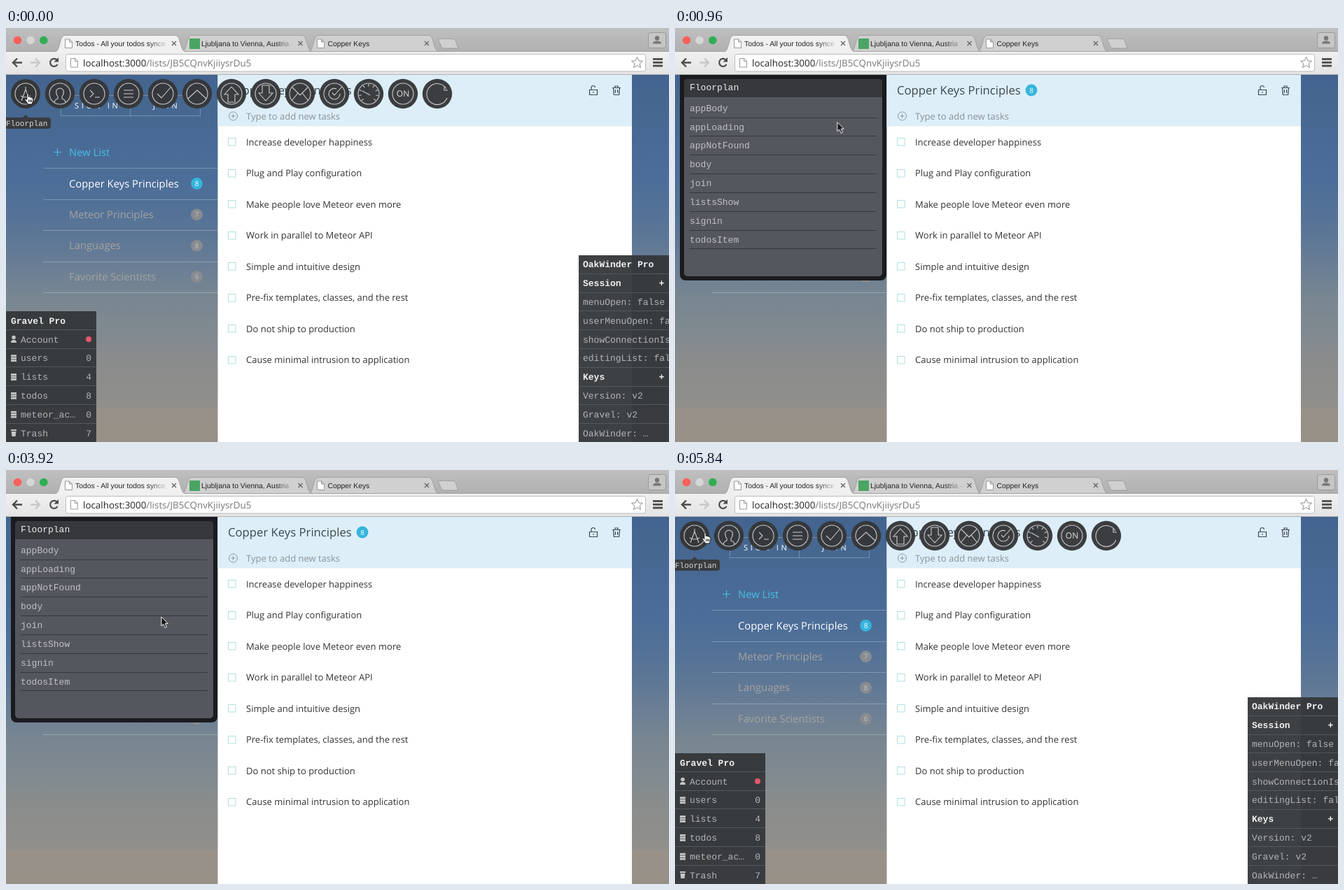
Recreate the animation shown at these times as an HTML page. Size 947 px wide and 592 px high, loop 5.92 s.

```html
<!DOCTYPE html>
<html lang="en">
<head>
<meta charset="utf-8">
<title>Todos</title>
<style>
@property --f { syntax: '<number>'; inherits: true; initial-value: 0; }
html, body { margin: 0; width: 100%; height: 100%; overflow: hidden; }
#stage { position: relative; width: 947px; height: 592px; overflow: hidden;
  --loop: 5920ms; animation: open var(--loop) ease infinite; }
#stage svg, #page, #page > div { position: absolute; left: 0; top: 0; }
#stage svg { overflow: visible; }
#page { width: 947px; height: 592px; clip-path: inset(67px 0 0 0);
  background: linear-gradient(#42648f 67px, #46678f 110px, #486a95 160px, #4d6e98 225px, #5a7596 290px,
    #6a7e95 340px, #788691 385px, #818a90 440px, #8a8c8c 475px, #908f8b 543px, #989189 543px, #969087); }
text { font-family: "Open Sans", sans-serif; white-space: pre; text-rendering: geometricPrecision; }
.mono, .mono text { font: 13px "Liberation Mono", monospace; }
.mono .b { font-weight: bold; fill: #f0f0f0; }
.tab { font: 10.35px "Liberation Sans", sans-serif; fill: #222; }
.mid { text-anchor: middle; }
.end { text-anchor: end; }

#tools { transform: translateY(calc(var(--f) * -95px)); }
#left, #right { opacity: calc(1 - var(--f) * .9); }
#left { transform: translate(calc(var(--f) * -130px), calc(var(--f) * 130px)); }
#right { transform: translate(calc(var(--f) * 130px), calc(var(--f) * 130px)); }
#tip { animation: tip var(--loop) step-end infinite; }

#page > #panel { left: 7px; top: calc(73px - var(--f) * 41px); overflow: hidden;
  width: calc(42px + var(--f) * 253px); height: calc(42px + var(--f) * 287px);
  border-radius: calc(21px - var(--f) * 13px);
  background: color-mix(in srgb, #1a1b1e min(100%, var(--f) * 160%), #353739); }
#panel svg { opacity: min(1, 1.8 * (1 - var(--f))); }
#content { position: absolute; left: 6px; right: 6px; bottom: 6px; top: calc(68px - var(--f) * 27px);
  overflow: hidden; border-radius: 5px; color: #c0c1c3; opacity: min(1, 2 * var(--f));
  background: color-mix(in srgb, #54575e calc(var(--f) * 100%), #35373a); }
#content h1 { margin: 0; padding-left: 8px; color: #ececec;
  background: color-mix(in srgb, #36383c calc(var(--f) * 100%), #222326);
  font: inherit; line-height: 26px; position: relative; z-index: 1; }
#strip { animation: view var(--loop) step-end infinite; }
.view { position: relative; left: 8px; width: 267px; height: 256px; box-sizing: border-box; white-space: pre; }
.list { padding-top: 3px; }
.list div { height: 25.85px; line-height: 27px; border-bottom: 1px solid #35373b; }
.json { padding-top: 7px; line-height: 16.63px; }
.json b { font-weight: 400; color: #f0517f; }
.json i { font-style: normal; color: #b4d455; }
.json u { text-decoration: none; color: #7fd0ee; }

#cursor { animation: move var(--loop) linear infinite; }
#hand { animation: hand var(--loop) step-end infinite; }
#arrow { animation: arrow var(--loop) step-end infinite; }

@keyframes open { 0%, .68% { --f: 0; } 6.93%, 86.15% { --f: 1; } 92.4%, 100% { --f: 0; } }
@keyframes tip { 0% { visibility: visible; } 1% { visibility: hidden; } 86.2% { visibility: visible; } }
@keyframes view {
  0% { transform: none; } 18.6% { transform: translateY(-256px); } 25.3% { transform: translateY(-512px); }
  36.8% { transform: translateY(-768px); } 43.2% { transform: translateY(-1024px); } 61.1% { transform: none; }
}
@keyframes move {
  0%, 1.35% { transform: translate(31px, 93px); }
  4%, 9.5% { transform: translate(32px, 91px); }
  18.6% { transform: translate(302px, 150px); }
  25.3% { transform: translate(375px, 186px); }
  32.43% { transform: translate(385px, 210px); }
  36.8% { transform: translate(388px, 230px); }
  43.2% { transform: translate(391px, 275px); }
  47.3% { transform: translate(394px, 310px); }
  50%, 55.4% { transform: translate(394px, 315px); }
  66.22% { transform: translate(222px, 210px); }
  83%, 100% { transform: translate(43px, 89px); }
}
@keyframes hand {
  0% { visibility: visible; } 3% { visibility: hidden; } 18.6% { visibility: visible; }
  61.1% { visibility: hidden; } 86.8% { visibility: visible; }
}
@keyframes arrow {
  0% { visibility: hidden; } 3% { visibility: visible; } 18.6% { visibility: hidden; }
  61.1% { visibility: visible; } 86.8% { visibility: hidden; }
}
</style>
</head>
<body>
<div id="stage">
  <div id="page">
    <svg id="app" width="947" height="592"></svg>
    <svg id="left" class="mono" width="947" height="592"></svg>
    <svg id="right" class="mono" width="947" height="592"></svg>
    <svg id="tools" width="947" height="592"></svg>
    <svg id="tip" width="947" height="592">
      <path d="M24 128l4-4 4 4H60a4 4 0 0 1 4 4v8a4 4 0 0 1-4 4H0V128Z" fill="#393b3d"/>
      <text x="0" y="139.5" fill="#d8d8d8" style="font:11px 'Liberation Mono',monospace">Floorplan</text>
    </svg>
    <div id="panel" class="mono">
      <svg id="compass" width="42" height="42"></svg>
      <div id="content"><h1>Floorplan</h1><div id="strip"></div></div>
    </div>
  </div>
  <svg id="chrome" width="947" height="67"></svg>
  <svg id="cursor" width="20" height="20" stroke-linejoin="round">
    <path id="arrow" d="M0 0V13.2L3 10.4 5.2 15.6 7.6 14.6 5.4 9.6H9.4Z" fill="#111" stroke="#fff"/>
    <path id="hand" d="M-1.2 1.2Q0-.8 1.2 1.2V5.4Q2.6 4.4 3.4 6 5 5.2 5.6 6.8 7.6 6.2 7.8 8.4V11Q7.6 13 6.4 14.4V16H-.4V14.6Q-2.2 12.8-4 9.6-4.6 7.6-2.6 8.2L-1.2 9.8Z
      M1.6 9.5V13M3.6 9.5V13M5.5 9.5V13" fill="#fff" stroke="#111"/>
  </svg>
</div>
<script>
const put = (id, ...parts) => { document.getElementById(id).innerHTML = parts.flat().join(''); };
const text = (x, y, s, size, fill, more = '') =>
  `<text x="${x}" y="${y}" dy=".35em" fill="${fill}" ${size ? `font-size="${size}"` : ''} ${more}>${s}</text>`;
const rect = (x, y, w, h, fill, more = '') =>
  `<rect x="${x}" y="${y}" width="${w}" height="${h}" fill="${fill}" ${more}/>`;
const dot = (x, y, r, fill, more = '') => `<circle cx="${x}" cy="${y}" r="${r}" fill="${fill}" ${more}/>`;
const line = (d, stroke, width = 1, more = '') =>
  `<path d="${d}" fill="none" stroke="${stroke}" stroke-width="${width}" ${more}/>`;
const badge = (x, y, n, fill, ink) => dot(x, y, 8.4, fill) + text(x, y, n, 10, ink, 'class="mid"');

// Todo app
const lists = [['Copper Keys Principles', 8], ['Meteor Principles', 7], ['Languages', 8], ['Favorite Scientists', 6]];
const tasks = ['Increase developer happiness', 'Plug and Play configuration', 'Make people love Meteor even more',
  'Work in parallel to Meteor API', 'Simple and intuitive design', 'Pre-fix templates, classes, and the rest',
  'Do not ship to production', 'Cause minimal intrusion to application'];
const faint = 'rgba(255,255,255,.26)';
put('app',
  line('M78.5 96.5H277.5V125.5H78.5ZM177.5 96.5V125.5', faint),
  text(98, 111, 'SIGN IN', 11, '#fff', 'letter-spacing="3.7"'),
  text(210, 111, 'JOIN', 11, '#fff', 'letter-spacing="4"'),
  line('M68 177.5H79M73.5 172V183', '#46bfe6', 1.2),
  text(90, 178, 'New List', 14.8, '#46bfe6'),
  [0, 1, 2, 3, 4].map(i => line(`M53 ${Math.round(200 + 44.5 * i) + .5}H302`, faint)),
  lists.map(([name, n], i) => {
    const y = 222.5 + 44.4 * i;
    return text(90, y, name, 14.8, i ? '#a5a4a1' : '#fff') +
      badge(272.5, y, n, i ? '#888c91' : '#35b5dc', i ? '#c2c2c0' : '#fff');
  }),
  rect(302.5, 67, 591.5, 525, '#fff'), rect(302.5, 67, 591.5, 73.5, '#ddeef8'),
  text(317, 89.5, lists[0][0], 16.7, '#3d4852'),
  badge(509, 89, 8, '#35b5dc', '#fff'),
  line('M833.5 88.5H844.5V95.5H833.5ZM836 88V85.5Q836 82.5 838.7 82.5 841 82.5 841.5 85M839 91V93', '#3d4852', 1.2),
  line('M866 85.5H878M870 85V83H874V85M867.5 86L868.3 95.5H875.7L876.5 86M870.4 88V93M873.6 88V93', '#3d4852', 1.2),
  dot(324.5, 126, 6, 'none', 'stroke="#8b989f"'), line('M321.5 126H327.5M324.5 123V129', '#8b989f'),
  text(343, 126, 'Type to add new tasks', 13, '#8b9297'),
  tasks.map((s, i) => {
    const y = 163 + 44.5 * i;
    return rect(317.5, Math.round(y) - 5.5, 10.5, 10.5, '#fff', 'stroke="#b2dede"') + text(343, y, s, 13, '#333');
  }));

// Corner inspectors
const rowY = (top, i) => top + 13.2 + 26.82 * i;
const box = (x, y, rows) => rect(x, y, 130, 270, '#34373a', 'opacity=".95"') +
  Array.from({ length: rows - 1 }, (_, i) => line(`M${x} ${Math.round(y + 26.8 * (i + 1)) - .5}h130`, '#55585b')).join('');
const soft = '#b2b4b6';
const stack = y => [-4.5, -1, 2.5].map(d => rect(7, y + d, 8, 2.8, '#c5c6c8')).join('');
const person = y => dot(11, y - 2.5, 2.8, '#c5c6c8') + `<path d="M7 ${y + 5}q0-4 4-4t4 4z" fill="#c5c6c8"/>`;
const bin = y => `<path d="M7 ${y - 5}h8v2h-8zM7.6 ${y - 2}h6.8l-.8 7h-5.2z" fill="#c5c6c8"/>`;
const stores = [['Account', ''], ['users', 0], ['lists', 4], ['todos', 8], ['meteor_ac…', 0], ['Trash', 7]];
put('left', box(-1, 405, 7), text(7, 418, 'Gravel Pro', 0, '#fff', 'class="b"'),
  stores.map(([name, n], i) => {
    const y = rowY(405, i + 1), icon = i === 0 ? person : i === 5 ? bin : stack;
    return icon(y) + text(21, y, name, 0, soft) +
      (i ? text(122, y, n, 0, soft, 'class="end"') : dot(118, y, 4, '#e8566c'));
  }));
const session = ['*OakWinder Pro', '*Session', 'menuOpen: false', 'userMenuOpen: false', 'showConnectionIssue: false',
  'editingList: false', '*Keys', 'Version: v2', 'Gravel: v2', 'OakWinder: …'];
put('right', box(818, 325, 10),
  session.map((s, i) => {
    const bold = s[0] === '*', y = rowY(324.5, i);
    return text(824, y, bold ? s.slice(1) : s, 0, soft, bold ? 'class="b"' : '') +
      (bold && i ? text(932.5, y, '+', 0, '#fff', 'class="b"') : '');
  }));

// Round tool buttons, glyphs drawn around their own centre
const ring = 'M-15 0a15 15 0 1 0 30 0a15 15 0 1 0-30 0';
const ticks = Array.from({ length: 9 }, (_, i) => {
  const a = Math.PI * (.75 + i * 3 / 16), at = r => `${(r * Math.cos(a)).toFixed(1)} ${(r * Math.sin(a)).toFixed(1)}`;
  return `M${at(14)}L${at(10.5)}`;
}).join('');
const glyphs = [
  'M0-10V-6M0-6L-6 10M0-6L6 10M-7 3Q0 7 7 3',
  'M-8 12Q-7 8-3 7V4Q-6 0-5-5 0-11 5-5 6 0 3 4V7Q7 8 8 12',
  'M-6-5L-1 0-6 5M1 5H8',
  'M-7-5H7M-7 0H7M-7 5H7',
  'M-8 0L-2 6 11-9',
  'M-13 7L0-5 13 7',
  'M-10 1L0-10 10 1H5V12H-5V1Z',
  'M-10-1L0 10 10-1H5V-12H-5V-1Z',
  'M-11-9L0 2 11-9M-11 9L-3-1M11 9L3-1',
  'M-8 0a8 8 0 1 0 16 0M-8 0a8 8 0 0 1 11-7M-3-1L0 2 11-10',
  ticks + 'M2 2L-9-4',
  '',
  'M10-11V-5H15'];
const glyph = (i, x, y) => `<g transform="translate(${x} ${y})">` +
  line((i === 12 ? 'M13-7A15 15 0 1 0 14 6' : ring) + glyphs[i], '#cbcccd', 1.1) +
  (i === 11 ? text(0, 0, 'ON', 12, '#e4e4e4', 'class="mid"') : '') + '</g>';
put('tools', glyphs.map((_, i) => i ? dot(28 + 49 * i, 94, 21.2, '#353739', 'opacity=".96"') + glyph(i, 28 + 49 * i, 94) : ''));
put('compass', glyph(0, 21, 21));

// Panel views: the template list, then the data of each hovered task
const templates = ['appBody', 'appLoading', 'appNotFound', 'body', 'join', 'listsShow', 'signin', 'todosItem'];
const json = (title, time, id) => `<div class="view json">{
  Helpers:  checkedClass,
editingClass,
  Events: 0
}, {
  <b>"listId"</b>: <i>"JB5CQnvKjiiysrDu5"</i>,
  <b>"text"</b>: <i>"${title}"</i>,
  <b>"checked"</b>: <u>false</u>,
  <b>"createdAt"</b>: <i>"2015-09-
18T${time}Z"</i>,
  <b>"_id"</b>: <i>"${id}"</i>
}</div>`;
put('strip',
  '<div class="view list">', templates.map(s => `<div>${s}</div>`), '</div>',
  json('Increase developer\nhappiness', '10:49:58.214', 'tW8rNc3KpQ5hXzL2d'),
  json('Plug and Play\nconfiguration', '10:49:41.832', '6Cs7a2JyNTEFK4eKm'),
  json('Make people love Meteor\neven more', '10:49:17.465', 'Rb9vGm4TsE7yHk3Ja'),
  json('Work in parallel to\nMeteor API', '10:48:52.722', '4eqXyGPGESCv5C893'));

// Browser frame
const tab = (x, fill) => `<path d="M${x} 34C${x + 8} 34 ${x + 6} 10.5 ${x + 14} 10.5H${x + 172}C${x + 180} 10.5 ${x + 178} 34 ${x + 187} 34" fill="${fill}" stroke="#999" stroke-width=".8"/>`;
const sheet = (x, y) => `<path d="M${x} ${y}h6l4 4v8.5h-10zm6 0v4h4" fill="#fff" stroke="#999"/>`;
const close = x => line(`M${x - 3} 19l6 6m0-6l-6 6`, '#666', 1.4);
const fade = (id, c) => `<linearGradient id="${id}"><stop stop-color="${c}" stop-opacity="0"/><stop offset="1" stop-color="${c}"/></linearGradient>`;
put('chrome',
  '<defs>', fade('fadeA', '#f0f0f0'), fade('fadeB', '#d0d0d0'),
  '<linearGradient id="bar" x2="0" y2="1"><stop stop-color="#bfbfbf"/><stop offset="1" stop-color="#b0b0b0"/></linearGradient>',
  '<linearGradient id="tool" x2="0" y2="1"><stop stop-color="#f0f0f0"/><stop offset="1" stop-color="#e4e4e4"/></linearGradient></defs>',
  rect(0, 0, 947, 34, 'url(#bar)'), rect(0, 33.5, 947, 33.5, 'url(#tool)'),
  line('M0 66.5H947', '#b0b0b0'),
  dot(16.5, 17.5, 5.8, '#fc605b'), dot(35, 17.5, 5.8, '#d6d6d6'), dot(53.8, 17.5, 5.8, '#2fae52'),
  tab(432, '#d0d0d0'), tab(251, '#d0d0d0'), line('M0 33.5H947', '#999', .8), tab(70, '#f0f0f0'),
  '<path d="M617 15.5H638Q641 15.5 642 18L646 29H626Q623 29 622 27Z" fill="#cfcfcf" stroke="#999" stroke-width=".8"/>',
  sheet(84.5, 16), sheet(444.5, 16), rect(262, 15, 15, 15, '#4aa564'),
  text(99, 22.5, 'Todos - All your todos synce', 0, '#222', 'class="tab"'),
  text(279, 22.5, 'Ljubljana to Vienna, Austria -', 0, '#222', 'class="tab"'),
  text(459.5, 22.5, 'Copper Keys', 0, '#222', 'class="tab"'),
  rect(204, 14, 28, 17, 'url(#fadeA)'), rect(386, 14, 26, 17, 'url(#fadeB)'),
  close(240), close(420.5), close(601),
  rect(917.5, 6.5, 25, 22, '#c6c6c6', 'rx="3" stroke="#999"'),
  dot(930, 14.5, 3.2, '#777'), '<path d="M924 22.5q0-4 6-4t6 4z" fill="#777"/>',
  line('M23 49.5H10M16 43.5L10 49.5 16 55.5', '#4c4c4c', 2.4),
  line('M35 49.5H48M42 43.5L48 49.5 42 55.5', '#c8c8c8', 2.4),
  line('M73 46A5.5 5.5 0 1 0 73.5 52', '#4c4c4c', 2.2), '<path d="M75 42V48.5H68.5Z" fill="#4c4c4c"/>',
  rect(85.5, 37.5, 828, 24.5, '#fff', 'rx="3" stroke="#bcbcbc"'), sheet(92.5, 43.5),
  text(110, 50, '<tspan fill="#222">localhost:3000</tspan>/lists/JB5CQnvKjiiysrDu5', 13.4, '#777'),
  line('M901.5 41.5L903.8 46.8 909.5 47.3 905.2 51 906.5 56.6 901.5 53.6 896.5 56.6 897.8 51 893.5 47.3 899.2 46.8Z', '#8c8c8c'),
  [44.5, 49.3, 54.1].map(y => line(`M924 ${y}H938`, '#4c4c4c', 2.8)));
</script>
</body>
</html>
```
